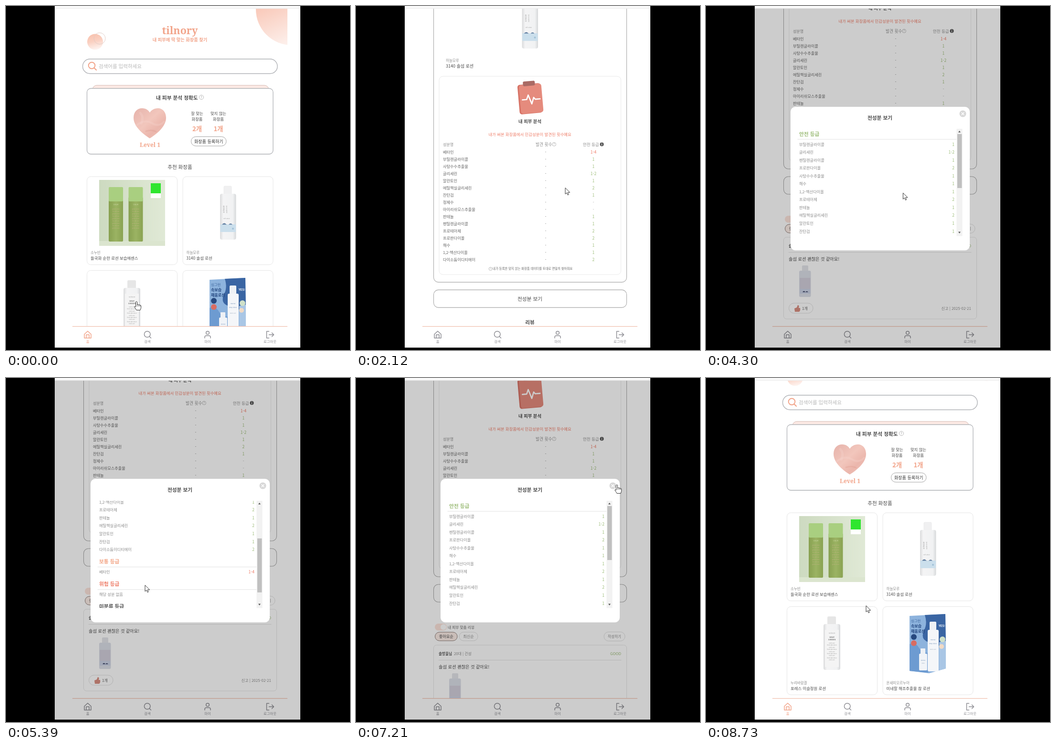
Animation, 720 px wide and 720 px high, one loop 8.88 s. Source, as an HTML page:

```html
<!DOCTYPE html>
<html lang="ko">
<head>
<meta charset="utf-8">
<title>화장품 찾기</title>
<style>
html, body { margin: 0; width: 100%; height: 100%; overflow: hidden; background: #000; }
svg { display: block; width: 100vw; height: 100vh; font-family: "Noto Sans CJK KR", "Noto Sans", sans-serif; }
</style>
</head>
<body>
<svg id="stage" viewBox="0 0 720 720"></svg>
<script>
const LOOP = 8880;
const PEACH = '#f2a58b', GREEN = '#9cbc78', RED = '#ee7d68', INK = '#4a4a4a', GREY = '#8c8c8c', EDGE = '#b0b2b6';

// ---- drawing helpers ----
const text = (x, y, size, str, fill = INK, weight = 400, anchor = 'start', extra = '') =>
  `<text x="${x}" y="${y}" font-size="${size}" fill="${fill}" font-weight="${weight}" text-anchor="${anchor}" ${extra}>${str}</text>`;
const mid = (x, y, size, str, fill, weight) => text(x, y, size, str, fill, weight, 'middle');
const end = (x, y, size, str, fill, weight) => text(x, y, size, str, fill, weight, 'end');
const serif = (x, y, size, str) =>
  text(x, y, size, str, PEACH, 900, 'middle', 'font-family="Noto Serif, serif"');
const box = (x1, y1, x2, y2, r, fill, stroke = 'none', width = 1) =>
  `<rect x="${x1}" y="${y1}" width="${x2 - x1}" height="${y2 - y1}" rx="${r}" fill="${fill}" stroke="${stroke}" stroke-width="${width}"/>`;
const dot = (x, y, r, fill, stroke = 'none', width = 1) =>
  `<circle cx="${x}" cy="${y}" r="${r}" fill="${fill}" stroke="${stroke}" stroke-width="${width}"/>`;
const path = (d, fill, stroke = 'none', width = 1, extra = '') =>
  `<path d="${d}" fill="${fill}" stroke="${stroke}" stroke-width="${width}" stroke-linecap="round" stroke-linejoin="round" ${extra}/>`;
const rule = (x1, x2, y, color = '#e2e2e2', width = 1) => path(`M${x1} ${y}H${x2}`, 'none', color, width);
const shift = (x, y, body) => `<g transform="translate(${x} ${y})">${body}</g>`;
const times = (n, fn) => Array.from({ length: n }, (_, i) => fn(i)).join('');
const help = (x, y, r = 4) => dot(x, y, r, 'none', '#aaa', .8) + mid(x, y + r * .55, r * 1.6, '?', '#999');

const defs = `<defs>
  <linearGradient id="sun" x1=".2" y1=".4" x2=".45" y2="1"><stop offset="0" stop-color="#f9c8b8"/><stop offset="1" stop-color="#fdf1ed"/></linearGradient>
  <linearGradient id="ball" x1=".35" y1="0" x2=".6" y2="1"><stop offset="0" stop-color="#f9c2ae"/><stop offset=".45" stop-color="#fad0c1"/><stop offset="1" stop-color="#fef5f2"/></linearGradient>
  <linearGradient id="satin" x1="0" y1="0" x2="1" y2="1"><stop offset="0" stop-color="#e6b3ab"/><stop offset=".45" stop-color="#f2c6bc"/><stop offset=".7" stop-color="#ebb6ac"/><stop offset="1" stop-color="#f2cac1"/></linearGradient>
  <linearGradient id="glass"><stop offset="0" stop-color="#dadbdc"/><stop offset=".2" stop-color="#f4f4f5"/><stop offset=".8" stop-color="#f1f2f3"/><stop offset="1" stop-color="#d6d8da"/></linearGradient>
  <linearGradient id="olive"><stop offset="0" stop-color="#87a050"/><stop offset=".5" stop-color="#9bb363"/><stop offset="1" stop-color="#8aa352"/></linearGradient>
  <linearGradient id="meadow"><stop offset="0" stop-color="#cddac0"/><stop offset="1" stop-color="#e0e9d6"/></linearGradient>
  <clipPath id="view"><rect x="102" y="5.5" width="514" height="665"/></clipPath>
  <clipPath id="column"><rect x="102" y="0" width="487" height="400"/></clipPath>
  <clipPath id="list"><rect x="190" y="257" width="346" height="224.5"/></clipPath>
</defs>`;

// ---- product pictures, placed as on the unscrolled home page ----
const greenBottle = x =>
  box(x, 400, x + 30, 493, 2, 'url(#olive)') + box(x, 379, x + 30, 409, 2, '#a9cf80') +
  mid(x + 15, 417, 4, 'CALM', '#d3dcae') +
  times(9, i => mid(x + 15, 426 + i * 5, 2.6, i % 2 ? 'for soft skin' : 'gentle lotion', '#c3b585'));
const greenPhoto = box(195, 364, 333, 502, 0, 'url(#meadow)') + path('M195 492H333V502H195Z', '#dbe5cf') +
  greenBottle(215) + greenBottle(256.5) + box(303, 392, 324, 402, 0, '#fff') + box(303, 371, 324, 392, 0, '#2fe62f');

const clearBottle = box(456, 377, 472, 396, 2, '#f0f0f1', '#e2e3e4', .6) + box(448, 393, 481.5, 489, 4, 'url(#glass)') +
  box(448.5, 457, 481, 473, 0, '#cbdfec') +
  path('M452 457.5q4-5 8-1.5l2 1.5Zm14 0q4-4.5 8 0Z', '#5f7c9f') +
  times(4, i => mid(456, 421 + i * 4, 3.6, '솔섬로션'[i], '#888') + mid(462, 421 + i * 4, 3.6, '맑은물결'[i], '#aaa')) +
  text(455, 446, 2.6, 'Soft Lotion', '#999') + dot(475, 466, 2, '#a3c2d8');

const tallBottle = box(254, 574, 272, 592, 2.5, '#e6e6e6') + box(246, 590, 281, 686, 4, 'url(#glass)') +
  box(249, 602, 278, 680, 1, '#f4f4f4') + mid(263.5, 610, 2.8, 'nuribaram', '#999') +
  mid(263.5, 619, 3.8, 'DEWY', '#777', 700) + mid(263.5, 623.5, 3.8, 'GARDEN', '#777', 700) +
  times(9, i => mid(263.5, 631 + i * 4.4, 2.7, i % 2 ? 'fresh skin lotion' : 'mild care', '#999'));

const blueBox = path('M426 573L501 569L502 683L467 693L426 688Z', '#8db3dd') +
  path('M458 571L501 569L502 632Q480 640 466 628Q448 622 456 604Q464 590 458 571Z', '#3a65a3') +
  path('M426 632Q438 626 446 640Q452 652 464 650L465 692L426 688Z', '#6d9bd1') + path('M488 628L502 625L502 683L488 687Z', '#a9c6e5') +
  dot(495, 622, 6, '#cfe0c8') + dot(493, 637, 5, '#f0d9c4') +
  text(429, 586, 7.4, '싱그런', '#3c659c') + text(429, 597, 8, '속보습', '#21457e', 700) + text(429, 608, 8, '채움로션', '#21457e', 700) +
  dot(435, 617, 6, '#27497f') + dot(435, 630, 6, '#d96c62') + text(487, 596, 6, 'YES!', '#fff', 700) +
  box(468, 585, 482, 603, 2, '#eef1f5') + box(464, 602, 487, 689, 3, '#f4f6f9') +
  box(449, 641, 459, 653, 1, '#eef1f5') + box(446, 652, 463, 687, 2, '#f1f4f8') +
  mid(475, 624, 3, 'mineral', '#6d8db4') + mid(475, 632, 3, 'deep lotion', '#6d8db4') + mid(475, 644, 2.6, 'moist care', '#9ab') +
  mid(454.5, 667, 2.6, 'mineral', '#6d8db4') + mid(454.5, 673, 2.4, 'lotion', '#9ab');

const product = (x, y, brand, name, picture) =>
  box(x, y, x + 189, y + 184.5, 8, '#fff', '#e6e6e6') + picture +
  text(x + 7.5, y + 162, 7.5, brand, GREY) + text(x + 7.5, y + 174, 8.4, name);

// ---- home ----
const HEART = 'M301 277C290 270 267 254 267 234C267 221 275 214 285 214C293 214 298 218 301 223C304 218 310 214 318 214C328 214 335 222 335 234C335 254 312 270 301 277Z';
const homePage =
  `<g clip-path="url(#column)">${dot(598, 7, 75, 'url(#sun)')}</g>` +
  dot(186.5, 75, 16.5, 'url(#ball)') + dot(196, 68, 12, 'none', '#dfcac3', .9) +
  serif(364, 59, 21.5, 'tilnory') + mid(364, 74, 9.2, '내 피부에 딱 맞는 화장품 찾기', PEACH, 700) +
  box(160.5, 111, 568, 141.5, 15, '#fff', EDGE, 1.4) +
  dot(179.5, 124.5, 6.8, 'none', PEACH, 2) + path('M184.5 129.5L189 134', 'none', PEACH, 2.2) +
  text(194, 130, 10.5, '검색어를 입력하세요', '#b8b8b8') +
  box(181, 166, 550, 200, 9, '#fdeae5', '#d3b8b1') + box(169.5, 172.5, 559, 310, 8, '#fff', EDGE, 1.3) +
  text(314, 195.5, 10.7, '내 피부 분석 정확도', INK, 700) + help(409, 191, 4.6) +
  path(HEART, 'url(#satin)') + path('M273 250Q290 236 305 245T331 242', 'none', '#f5d5cd', 4, 'opacity=".3"') +
  path('M281 224Q289 232 283 246', 'none', '#f5d5cd', 5, 'opacity=".3"') + path('M293 262Q306 258 314 263', 'none', '#dc978d', 3, 'opacity=".3"') +
  serif(301.5, 295, 12, 'Level 1') +
  mid(400, 228, 8.4, '잘 맞는', INK, 500) + mid(400, 240, 8.4, '화장품', INK, 500) +
  mid(444.5, 228, 8.4, '맞지 않는', INK, 500) + mid(444.5, 240, 8.4, '화장품', INK, 500) +
  mid(400, 261.5, 13.3, '2개', PEACH, 700) + mid(444.5, 261.5, 13.3, '1개', PEACH, 700) +
  box(387.5, 273.5, 461, 293, 9.7, '#fff', '#a5a5a5') + mid(424.3, 286.6, 9, '화장품 등록하기', '#333') +
  mid(364, 341, 10.6, '추천 화장품') +
  product(169.5, 357, '소누빈', '들국화 순한 로션 보습에센스', greenPhoto) +
  product(370, 357, '하늘모루', '3140 솔섬 로션', clearBottle) +
  product(169.5, 553.5, '누리바람결', '포레스 이슬정원 로션', tallBottle) +
  product(370, 553.5, '온새미오르누아', '미네랄 해조추출물 참 로션', blueBox);

// ---- product detail, placed as seen at DETAIL_END ----
const DETAIL_END = 300;
const GRADES = { 베타인: '1-4', 부틸렌글라이콜: '1', 사탕수수추출물: '1', 글리세린: '1-2', 알란토인: '1', 에틸헥실글리세린: '2',
  잔탄검: '1', 정제수: '-', 아이리쉬모스추출물: '-', 판테놀: '1', 펜틸렌글라이콜: '1', 프로테아제: '2', 프로판다이올: '2',
  해수: '1', '1,2-헥산다이올': '1', 다이소듐이디티에이: '2' };
const gradeColor = g => g === '1-4' ? RED : g === '-' ? '#aaa' : GREEN;

const clipboard = `<g transform="rotate(-5 364 -44)">` + box(340, -74, 388, -12, 5, '#d77366') + box(343, -73, 390, -13, 5, '#e58b7d') +
  box(352, -80, 377, -70, 3, '#a96a64') + path('M348 -42h9l4 -9l6 19l5 -13l3 4h10', 'none', '#fff', 2.6) + '</g>';
const reviewBottle = box(201, 543, 214, 556, 2, '#e3e5ea') + box(195, 554, 219.5, 609, 3, '#dcdfe8') +
  box(196, 569, 218.5, 592, 0, '#d3cfdc') + box(196, 592, 218.5, 602, 0, '#ccd3e6') +
  path('M202 599q3-5 6 0Zm6 0q3-4 6 0Z', '#3d4668');
const pill = (x1, y1, x2, y2, label, size, fill = '#fff', stroke = '#ddd', ink = GREY) =>
  box(x1, y1, x2, y2, (y2 - y1) / 2, fill, stroke) + mid((x1 + x2) / 2, (y1 + y2) / 2 + 3, size, label, ink);

const detailPage =
  box(162.5, 12 - DETAIL_END, 566.5, 341, 10, '#fff', '#a8a8a8', 1.1) + shift(-100.5, -637, clearBottle) +
  text(188, -120, 7.5, '하늘모루', GREY) + text(188, -108, 9, '3140 솔섬 로션') +
  box(174, -90, 554.5, 325, 8, 'none', '#e9e9e9') + clipboard +
  mid(364, 8, 9.3, '내 피부 분석', INK, 700) +
  mid(364, 35, 8.4, '내가 써본 화장품에서 민감성분이 발견된 횟수예요', RED, 500) +
  text(182, 56, 8, '성분명', GREY) + text(376, 56, 8.7, '발견 횟수', GREY) + help(414.7, 52.3, 3.8) +
  text(475, 56, 8.5, '안전 등급', GREY) + dot(514.5, 52.3, 4, '#555') + mid(514.5, 55, 6.5, 'i', '#fff', 700) +
  Object.entries(GRADES).map(([name, grade], i) => {
    const y = 72.3 + i * 15;
    return text(182, y, 8.2, name, '#666') + mid(397, y, 8.2, '-', '#777') + mid(497, y, 8.6, grade, gradeColor(grade), 500);
  }).join('') +
  help(281.5, 313, 3.4) + text(286, 315.3, 6.4, '내가 등록한 맞지 않는 화장품 데이터를 토대로 면밀히 찾아줘요', '#666') +
  box(162.5, 357, 566.5, 394, 10, '#fff', '#a8a8a8', 1.1) + mid(364, 380, 10.7, '전성분 보기') +
  mid(364, 428.5, 10.5, '리뷰', INK, 700) +
  box(165, 439, 190, 453.5, 7.2, '#fce3da') + dot(183, 446.2, 6, '#fff') + text(192, 449.5, 7.7, '내 피부 맞춤 리뷰', '#666') +
  pill(165.5, 457, 212, 475, '좋아요순', 8.2, '#fbece6', '#8d7e79', INK) +
  pill(216, 457, 255, 475, '최신순', 8.2) + pill(519, 456.5, 563, 475.5, '작성하기', 7.6) +
  box(162.5, 484, 566.5, 655, 6, '#fff', '#e4e4e4') +
  text(173, 504.5, 7.6, '솔방울님', '#555', 700) + text(205, 504.5, 7.8, '20대 | 건성', GREY) + end(555, 504.8, 8, 'GOOD', GREEN, 500) +
  rule(173, 555, 515.5) + text(173, 533.3, 9.2, '솔섬 로션 괜찮은 것 같아요!') + reviewBottle +
  box(173.5, 622, 224, 643, 10.5, '#fff', '#ddd') + path('M185 633l5-2l2-5q4 0 2 6h3q1 6-2 8h-9Z', '#d98e80') +
  text(201, 636, 8, '1개', '#666') + end(555, 636, 8, '신고 | 2025-02-21', GREY);

// ---- ingredient dialog ----
const SAFE = ['부틸렌글라이콜', '글리세린', '펜틸렌글라이콜', '프로판다이올', '사탕수수추출물', '해수', '1,2-헥산다이올',
  '프로테아제', '판테놀', '에틸헥실글리세린', '알란토인', '잔탄검', '다이소듐이디티에이'];
const group = (y, title, color, names) => text(195, y + 4, 10.7, title, color, 700) + rule(192, 524, y + 11.5) +
  names.map((name, i) => {
    const line = y + 25 + i * 16.55, grade = GRADES[name];
    return text(195, line, 8.2, name, GREY) + (grade ? end(520, line, 8.6, grade, gradeColor(grade), 500) : '');
  }).join('');
const dialog = box(102, 5, 616, 715, 0, 'rgba(0,0,0,.2)') + box(177, 211, 552, 511.5, 10, '#fff') +
  mid(364, 238, 10.7, '전성분 보기', INK, 700) +
  dot(537.5, 225.5, 7, '#d8d8d8') + path('M535 223l5 5m0 -5l-5 5', 'none', '#fff', 1.5) +
  `<g clip-path="url(#list)"><g id="items">` +
  group(267.5, '안전 등급', GREEN, SAFE) + group(513, '보통 등급', '#f2a383', ['베타인']) +
  group(560.3, '위험 등급', RED, ['해당 성분 없음']) + group(606.5, '미분류 등급', INK, ['정제수', '아이리쉬모스추출물']) +
  '</g></g>' + box(524.5, 257, 536.5, 481.5, 0, '#f2f2f2') +
  path('M528 264.5h5l-2.5-3.5Z', '#555') + path('M528 472.5h5l-2.5 3.5Z', '#555') +
  '<rect id="thumb" x="526" y="268" width="9.5" height="113" fill="#c0c0c0"/>';

// ---- fixed parts ----
const navItem = (x, label, icon, id = '') => `<g ${id}>` + shift(x, 688, path(icon, 'none', 'currentColor', 1.5)) +
  mid(x, 705.3, 7.3, label, 'currentColor') + '</g>';
const navBar = box(102, 670, 616, 715, 0, '#fff') + rule(139.5, 588.5, 670.7, '#f1c0ae', 1.3) + '<g color="#8f8f95">' +
  navItem(171, '홈', 'M-7 -1L0 -7.5L7 -1V7H-7ZM-3 7V0H3V7', 'id="homeTab"') +
  navItem(296, '검색', 'M6 -1A6.3 6.3 0 1 1 -6.6 -1A6.3 6.3 0 1 1 6 -1M4.5 4L7.5 7') +
  navItem(422, '마이', 'M3.3 -4A3.3 3.3 0 1 1 -3.3 -4A3.3 3.3 0 1 1 3.3 -4M-6 7V5Q-6 2 -2.5 2H2.5Q6 2 6 5V7') +
  navItem(552.5, '로그아웃', 'M-2 -7H-7V7H-2M-2 0H7.5M4 -4L8 0L4 4') + '</g>';
const hand = path('M-1.6 1.5Q0 -1 1.6 1.5V7Q3.5 5.8 4.6 7.4Q6.3 6.6 7.3 8.2Q9.6 7.6 9.6 10V13.5Q9 16 8 18.5H0Q-1.5 15.5 -4 12Q-4.6 9.6 -1.6 11.4Z', '#fff', '#333', 1) +
  path('M1.6 7V10.5M4.6 7.5V10.5M7.3 8.3V10.8', 'none', '#333', .8);
const arrow = path('M0 0V12.6L3 9.9L5.1 14.6L7.2 13.7L5.2 9.2H9.3Z', '#fff', '#333', 1);

const $ = id => document.getElementById(id);
$('stage').innerHTML = defs + box(102, 0, 616, 715, 0, '#fff') +
  `<g clip-path="url(#view)"><g id="home">${homePage}</g><g id="detail">${detailPage}</g></g>` + navBar +
  `<g id="dialog">${dialog}</g>` + box(102, 0, 616, 5, 0, '#fafafa') + rule(102.5, 615.5, 5, '#e6e6e6', 1) +
  `<g id="cursor"><g id="hand">${hand}</g><g id="arrow">${arrow}</g></g>`;

// ---- motion: [time, value...] keys with a smooth step between them ----
const HOME_SCROLL = [[790, 0], [1010, 75]];
const DETAIL_SCROLL = [[1970, 0], [2482, DETAIL_END], [6850, DETAIL_END], [7000, 225]];
const LIST_SCROLL = [[4700, 0], [5060, 75], [5090, 75], [5390, 129], [5550, 129], [5640, 174], [5850, 174], [6180, 75], [6360, 75], [6670, 0]];
const POINTER = [[300, 273, 618], [640, 431, 420], [1050, 431, 420], [1300, 438, 381], [2580, 438, 381], [2760, 443, 381],
  [4180, 443, 381], [4600, 291, 434], [6850, 291, 434], [7180, 546, 223], [8210, 546, 223], [8600, 335, 477]];

function sample(keys, t) {
  const next = keys.findIndex(key => key[0] > t);
  if (next === 0) return keys[0].slice(1);
  if (next < 0) return keys[keys.length - 1].slice(1);
  const a = keys[next - 1], b = keys[next];
  const p = (t - a[0]) / (b[0] - a[0]), eased = p * p * (3 - 2 * p);
  return a.slice(1).map((v, i) => v + (b[i + 1] - v) * eased);
}
const within = (t, from, to) => t >= from && t < to;
const show = (id, on) => $(id).setAttribute('visibility', on ? 'visible' : 'hidden');
const move = (id, x, y) => $(id).setAttribute('transform', `translate(${x} ${y})`);

function draw(now) {
  const t = now % LOOP;
  const onDetail = within(t, 1500, 8210);
  const [list] = sample(LIST_SCROLL, t);
  show('home', !onDetail);
  show('detail', onDetail);
  show('dialog', within(t, 3550, 7360));
  $('homeTab').setAttribute('color', onDetail ? '#8f8f95' : PEACH);
  move('home', 0, -sample(HOME_SCROLL, t)[0]);
  move('detail', 0, DETAIL_END - sample(DETAIL_SCROLL, t)[0]);
  move('items', 0, -list);
  $('thumb').setAttribute('y', 268 + list * .525);
  const pointing = t < 1500 || within(t, 2460, 3600) || within(t, 7100, 7400);
  show('hand', pointing);
  show('arrow', !pointing);
  move('cursor', ...sample(POINTER, t));
}
const start = performance.now();
function tick() {
  draw(performance.now() - start);
  requestAnimationFrame(tick);
}
tick();
</script>
</body>
</html>
```
